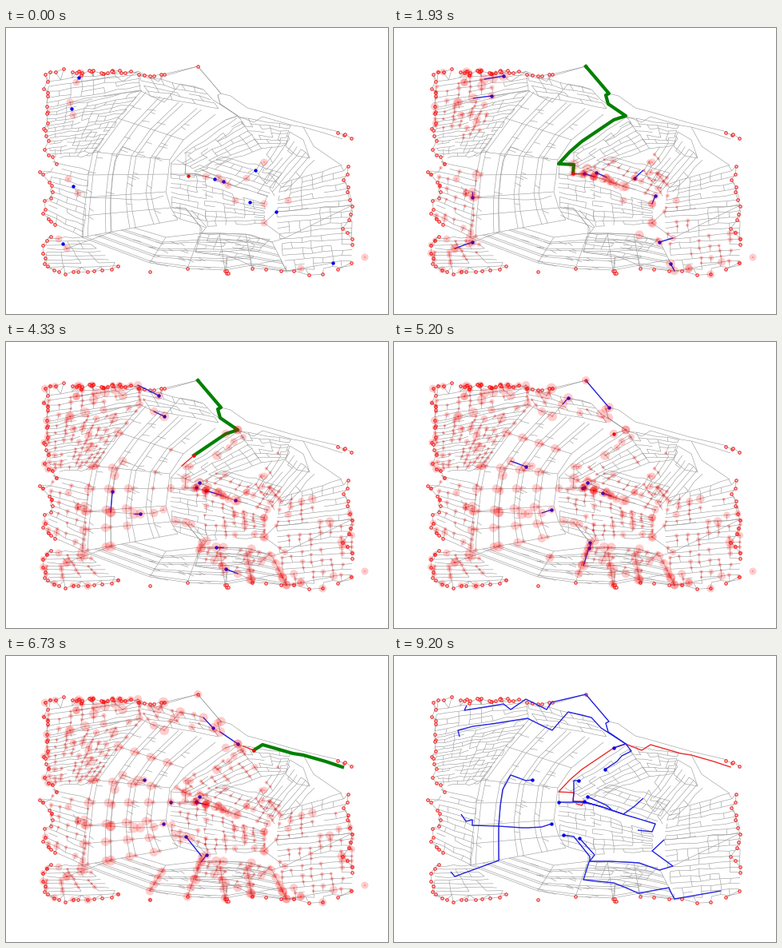
A matplotlib script that plays this animation: 478x358 px, repeating every 9.59 s.

```python
import numpy as np
import matplotlib.pyplot as plt
from matplotlib.animation import FuncAnimation
from matplotlib.collections import LineCollection

W, H, DPI = 478, 358, 100
FRAMES, STEP_MS = 137, 70
TICKS_PER_FRAME = STEP_MS * 15 / 1000
JUMPS = [np.ceil(9 + 11.5 * j) for j in range(9)] + [101 + 9 * j for j in range(1, 5)]
REPLAN = 7          # jump at which the runner turns to another exit
END_TICK = 138
rng = np.random.default_rng(12)


def pts(text):
    return np.array([p.split(",") for p in text.split()], float)


# One token per jump: corners joined by ">", "." waits
RUNNER = """228,185 235,187>238,182 224,182 225,171>206,170 220,155 235,142
275,115 . 290,110>297,113 310,118 321,111>359,122 372,124 400,132 421,139"""
FIRST_GOAL = pts("290,110 268,95 265,84 269,82 240,48")
UNITS = [
    """91,62 88,68>113,64 137,60 146,67 165,54 191,67 197,58>240,48 269,82
    265,84>268,95 290,110 297,119>285,125 279,132 264,142""",
    """82,101 80,93>99,88 122,85 167,78 185,87 198,93 211,78 218,70 247,77
    259,90 290,110 275,115""",
    "84,198 90,207>98,205 98,212 131,213 160,215 168,215 185,214 197,210",
    """71,270 76,276 98,268 131,256 131,213 133,187 136,167>146,149 165,156
    173,155""",
    "261,189 250,186 238,182",
    "272,192 266,187 253,181 242,176",
    """312,178 . 301,188 . 287,198 . 272,193 261,189 250,186 238,183 224,182
    225,171 225,156>231,156""",
    "305,218 323,220 327,210 290,199 270,192 250,186 236,183 . 206,183",
    """338,230 323,244>349,263 332,268 307,259 272,257 263,257 245,257 245,251
    . 225,226 212,224""",
    """409,294 369,301>351,304 346,295 344,290>306,297 290,290 275,284 237,280
    244,258 . 251,249 232,228"""]

# Town edge: corners, number of exits, wobble
EDGES = [("69,50 52,60 49,100 50,150 60,168", 20, 3.5),
         ("45,180 58,204 45,228 59,248", 12, 3),
         ("57,262 47,268 47,298 68,306", 9, 2),
         ("72,307 108,305 141,298", 8, 2),
         ("180,305 227,301", 2, 0), ("274,303 277,308", 4, 1),
         ("306,299 351,304 392,309 431,294", 8, 2),
         ("435,272 423,250 434,220 424,192 430,172", 13, 3),
         ("419,135 432,137", 4, 4), ("240,48 240,48", 1, 0),
         ("198,60 145,54", 9, 3), ("139,55 84,56", 17, 4)]

# Pairs of outer and inner canal; the others lie between them
CANALS = [("170,78 140,113 109,155 103,184 100,212 97,235 95,262",
           "262,108 222,140 205,165 203,183 200,205 206,225 215,240"),
          ("95,262 180,294 227,301 274,303 307,297 351,304",
           "160,250 200,262 243,257 267,257 300,258 333,268")]

STREETS = [
    """198,60 240,48 269,82 281,85 302,100 321,105 370,119 417,130""",
    "265,84 268,95 290,110", "206,170 206,183",
    "355,130 372,140 380,163 364,160 350,148 355,130",
    "372,124 385,148 420,172", "349,263 433,222",
    "206,225 225,226 243,248 243,257"]

# Street blocks by their corners, with how much later they are reached
BLOCKS = [
    ("54,66 165,54 168,78 50,100", 0), ("50,102 167,80 106,160 56,162", 5),
    ("58,168 104,178 96,262 52,240", 0), ("52,262 96,262 141,298 50,300", 5),
    ("168,60 247,77 265,100 180,85", 0), ("213,165 290,112 320,150 240,180", 75),
    ("238,182 327,212 345,180 270,160", 0), ("206,183 250,186 250,249 208,235", 60),
    ("245,195 323,220 323,244 252,249", 40), ("243,257 330,264 306,290 237,280", 5),
    ("312,178 345,130 385,165 340,215", 0), ("345,195 420,172 433,222 338,230", 20),
    ("338,230 433,222 432,298 351,304", 0), ("290,112 355,122 350,148 320,150", 120)]


def parse(route):
    return [np.empty((0, 2)) if hop == "." else pts(hop.replace(">", " "))
            for hop in route.split()]


def at(hops, k):
    return np.vstack(hops[:k + 1])[-1]


def trail(hops, k):
    if k == 0 or k >= len(hops):
        return at(hops, k)[None]
    return np.vstack([at(hops, k - 1), hops[k]])


def along(line, s):
    """Points at the shares s of a line's length."""
    d = np.r_[0, np.cumsum(np.hypot(*np.diff(line, axis=0).T))]
    return np.stack([np.interp(np.asarray(s) * d[-1], d, c) for c in line.T], -1)


runner_hops = parse(RUNNER)
unit_hops = [parse(u) for u in UNITS]
starts = np.array([h[0][0] for h in unit_hops])
roads, spots, exits = [], [], []     # spots: x, y, radius, jump when first reached


def add_spot(p, r, delay=0, latest=99):
    if p[0] > 345 and p[1] < 195:
        return
    gap = np.hypot(*(starts - p).T).min() + delay
    spots.append((*p, r, min(latest, max(1, np.ceil((gap - 14) / 14)))))


def add_block(corners, delay):
    a, b, c, d = pts(corners)
    rows = 1 + int(max(np.hypot(*(d - a)), np.hypot(*(c - b))) / 6.5)
    cols = 1 + int(np.hypot(*(b - a)) / 14)
    v = np.linspace(0, 1, rows)[:, None, None]
    u = np.linspace(0, 1, cols + 1)[None, :, None]
    grid = (1 - v) * ((1 - u) * a + u * b) + v * ((1 - u) * d + u * c)
    grid += rng.normal(0, .7, grid.shape)
    for i, row in enumerate(grid):
        for j, p in enumerate(row):
            if j < cols and rng.random() < .9:
                roads.append(row[j:j + 2])
            if i < rows - 1 and rng.random() < .5:
                roads.append(np.array([p, grid[i + 1, j]]))
                add_spot(p, min(6, 1.8 + rng.exponential(.9)), delay)
    return grid.reshape(-1, 2)


def add_canals(outer, inner):
    outer, inner = pts(outer), pts(inner)
    shares = [k / 4 + d for k in range(4) for d in (0, .06)] + [1]
    rings = [outer + t * (inner - outer) for t in shares]
    roads.extend(rings)
    roads.extend(np.array(rings)[:, k] for k in range(1, len(outer)))
    for k, ring in enumerate(rings[:-1]):
        for p in ring[1:]:
            add_spot(p, 2.8 if k % 2 else 5.4, 5)
        for s in rng.uniform(.1, .9, 4):     # short dead ends
            p = along(ring, s)
            roads.append(np.array([p, p + [rng.uniform(5, 11), rng.uniform(1, 4)]]))


def add_exits(nodes):
    for corners, count, wobble in EDGES:
        side = along(pts(corners), np.linspace(0, 1, count))
        side += rng.uniform(-wobble, wobble, side.shape)
        exits.extend(side)
        for p, q in zip(side, side[1:]):
            if np.hypot(*(q - p)) < 20:
                roads.append(np.array([p, q]))
        for p in side:
            near = nodes[np.hypot(*(nodes - p).T).argmin()]
            if np.hypot(*(near - p)) < 18:
                roads.append(np.array([p, near]))
            if rng.random() < .5:
                add_spot(p, rng.uniform(2.5, 5))


def build_town():
    nodes = np.vstack([add_block(*b) for b in BLOCKS])
    for pair in CANALS:
        add_canals(*pair)
    roads.extend(pts(s) for s in STREETS)
    roads.append(np.vstack(runner_hops))
    for hops in unit_hops:
        path = np.vstack(hops)
        roads.append(path)
        for p in (path[1], 2 * path[0] - path[1]):
            add_spot(p, 4.5, latest=0)
        for k, hop in enumerate(hops[1:], 1):
            for p in hop:
                add_spot(p, rng.uniform(4, 6.5), latest=k)
    add_exits(nodes)


def area(r):
    return (2 * r * 72 / DPI) ** 2


build_town()
spots = np.array(spots)

fig = plt.figure(figsize=(W / DPI, H / DPI), dpi=DPI, facecolor="white")
ax = fig.add_axes([0, 0, 1, 1])
ax.set(xlim=(0, W), ylim=(H, 0))
ax.axis("off")
ax.add_collection(LineCollection(roads, colors="#999999", linewidths=.42, zorder=1))
ax.scatter(*np.array(exits).T, s=area(1.7), facecolor="#ffe4e4",
           edgecolor="#f01818", linewidth=.75, zorder=3)
plan, = ax.plot([], [], color="green", lw=3, zorder=4)
red_trail, = ax.plot([], [], color="#f03030", lw=1, zorder=5)
trails = LineCollection([], colors="#2020e8", linewidths=.95, zorder=5)
ax.add_collection(trails)
units = ax.scatter([], [], s=area(2.2), color="#0000ee", linewidth=0, zorder=6)
runner, = ax.plot([], [], "o", color="#f01010", ms=3.2, mew=0, zorder=6)
halos = ax.scatter([], [], color="red", alpha=.2, linewidth=0, zorder=7)
cores = ax.scatter([], [], color="red", alpha=.25, linewidth=0, zorder=7)


def planned(k):
    if k in (0, REPLAN):
        return np.empty((0, 2))
    here = at(runner_hops, k)
    if k < REPLAN:
        return np.vstack([here, *runner_hops[k + 1:REPLAN], FIRST_GOAL])
    return np.vstack([here, *runner_hops[k + 1:]])


def draw(i):
    tick = int(i * TICKS_PER_FRAME + .5)
    k = sum(tick >= j for j in JUMPS)
    done = tick >= END_TICK
    seen = spots[(spots[:, 3] <= k) & (not done)]
    halos.set_offsets(seen[:, :2])
    halos.set_sizes(area(seen[:, 2]))
    cores.set_offsets(seen[:, :2])
    cores.set_sizes(np.full(len(seen), area(1.2)))
    units.set_offsets([at(h, k) for h in unit_hops])
    trails.set_segments([np.vstack(h) if done else trail(h, k) for h in unit_hops])
    red = np.vstack(runner_hops) if done else trail(runner_hops, k)
    red_trail.set_data(*red.T)
    plan.set_data(*(planned(k)[:0] if done else planned(k)).T)
    runner.set_data(*(red[:0] if done else red[-1:]).T)
    return halos, cores, trails, units, red_trail, plan, runner


anim = FuncAnimation(fig, draw, frames=FRAMES, interval=STEP_MS,
                     init_func=lambda: draw(0), repeat=True, repeat_delay=0)
plt.show()
```
